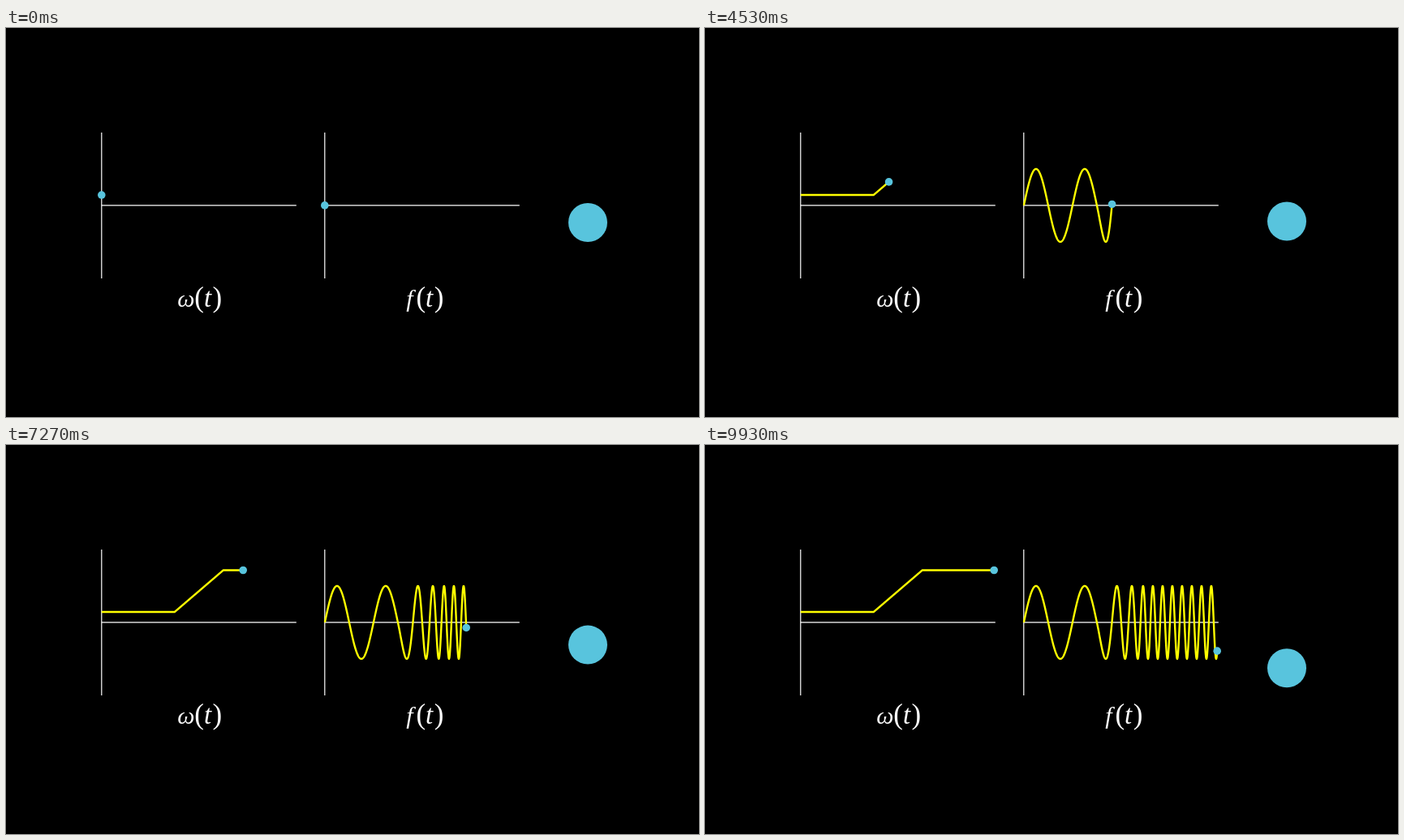
An HTML page with a canvas that plays this animation: 854 px wide and 480 px high, repeating every 9990 ms.

```html
<!DOCTYPE html>
<html lang="en">
<head>
<meta charset="utf-8">
<title>Frequency sweep</title>
<style>
  html, body { margin: 0; width: 100%; height: 100%; overflow: hidden; background: #000; }
  canvas { display: block; }
</style>
</head>
<body>
<canvas id="stage" width="854" height="480"></canvas>
<script>
const ctx = document.getElementById("stage").getContext("2d");

const LOOP_MS = 9990, FPS = 15;
const BLUE = "#58c4dd", YELLOW = "#ffff00", WHITE = "#ffffff";
const AXIS_Y = 218.9, AXIS_W = 240, AXIS_H = 180;
const OMEGA_X = 117.8, WAVE_X = 392.8;
const PX_PER_SECOND = 24, PX_PER_HZ = 32.2, AMPLITUDE = 45;
const LOW = 0.4, HIGH = 2, RAMP_START = 3.75, RAMP_END = 6.25;
const RAMP_LENGTH = RAMP_END - RAMP_START;
const SLOPE = (HIGH - LOW) / RAMP_LENGTH;
const LAG = 0.005; // the wave trails the clock slightly

const clamp = (v, lo, hi) => Math.min(hi, Math.max(lo, v));

function frequency(t) {
  return LOW + SLOPE * clamp(t - RAMP_START, 0, RAMP_LENGTH);
}

// Integral of frequency, in cycles.
function cycles(t) {
  const ramp = clamp(t - RAMP_START, 0, RAMP_LENGTH);
  const after = Math.max(0, t - RAMP_END);
  return LOW * t + SLOPE * ramp * (ramp / 2 + after);
}

const omegaHeight = t => PX_PER_HZ * frequency(t);
const waveHeight = t => AMPLITUDE * Math.sin(2 * Math.PI * cycles(Math.max(0, t - LAG)));

function line(x1, y1, x2, y2) {
  ctx.beginPath();
  ctx.moveTo(x1, y1);
  ctx.lineTo(x2, y2);
  ctx.stroke();
}

function disc(x, y, radius) {
  ctx.fillStyle = BLUE;
  ctx.beginPath();
  ctx.arc(x, y, radius, 0, 2 * Math.PI);
  ctx.fill();
}

function graph(x0, height, t) {
  ctx.strokeStyle = WHITE;
  ctx.lineWidth = 1.2;
  line(x0, AXIS_Y - AXIS_H / 2, x0, AXIS_Y + AXIS_H / 2);
  line(x0, AXIS_Y, x0 + AXIS_W, AXIS_Y);

  if (t > 0) {
    ctx.strokeStyle = YELLOW;
    ctx.lineWidth = 2.4;
    ctx.lineJoin = "round";
    ctx.beginPath();
    for (let s = 0; s < t; s += 0.01) {
      ctx.lineTo(x0 + s * PX_PER_SECOND, AXIS_Y - height(s));
    }
    ctx.lineTo(x0 + t * PX_PER_SECOND, AXIS_Y - height(t));
    ctx.stroke();
  }
  disc(x0 + t * PX_PER_SECOND, AXIS_Y - height(t), 4.8);
}

function glyph(char, x, size, style = "normal") {
  ctx.font = `${style} ${size}px "Liberation Serif", serif`;
  ctx.fillText(char, x, 344);
}

function label(name, nameX, argX) {
  ctx.fillStyle = WHITE;
  glyph(name, nameX, 30, "italic");
  glyph("(", argX, 35);
  glyph("t", argX + 11.6, 33, "italic");
  glyph(")", argX + 22.2, 35);
}

function draw(ms) {
  const t = Math.floor((ms + 5) * FPS / 1000) / FPS;
  ctx.fillStyle = "#000";
  ctx.fillRect(0, 0, 854, 480);
  graph(OMEGA_X, omegaHeight, t);
  graph(WAVE_X, waveHeight, t);
  disc(717, 240 - waveHeight(t), 24);
  label("ω", 211.3, 232.3);
  label("f", 493.2, 505.5);
}

const start = performance.now();
function tick() {
  draw(Math.min((performance.now() - start) % LOOP_MS, LOOP_MS - 1));
  requestAnimationFrame(tick);
}
tick();
</script>
</body>
</html>
```
